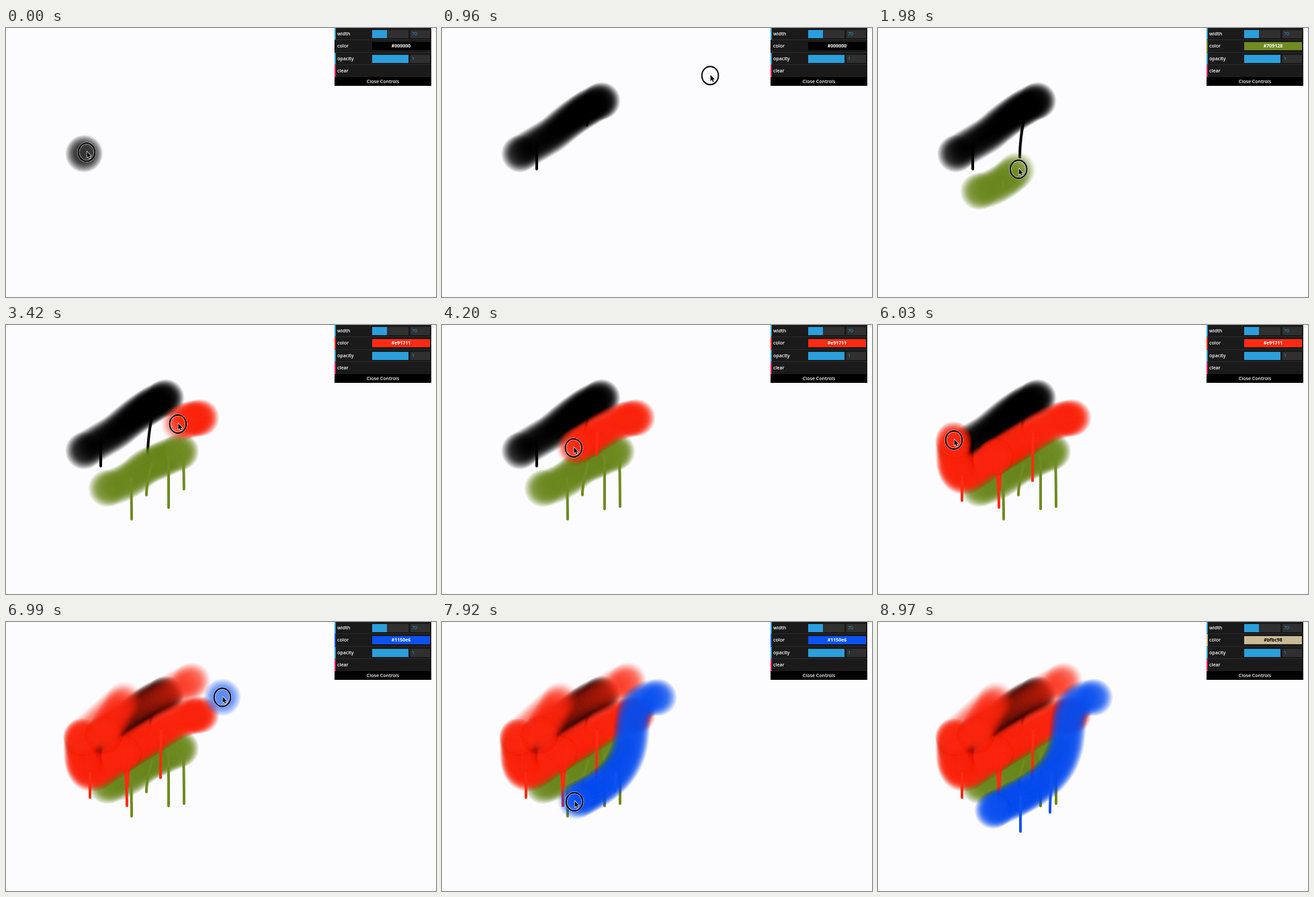
An HTML page with a canvas that plays this animation: 640x400 px, repeating every 9000 ms.

```html
<!DOCTYPE html>
<html lang="en">
<head>
<meta charset="utf-8">
<title>Spray paint</title>
<style>
  html, body { margin: 0; width: 100%; height: 100%; overflow: hidden; background: #fcfcfe; }
  canvas { position: absolute; left: 0; top: 0; }
  #panel {
    position: absolute; left: 489px; top: 0; width: 144px; height: 86px; overflow: hidden;
    background: #1a1a1a; color: #fff;
    font: 600 7px/18px "Open Sans", "Noto Sans", sans-serif;
  }
  .row {
    position: absolute; left: 0; width: 144px; height: 18.5px; box-sizing: border-box;
    padding-left: 2px; border-left: 2px solid #2fa1d6; border-bottom: 1px solid #2c2c2c;
  }
  .track, .num, #swatch { position: absolute; top: 3px; height: 12px; line-height: 12px; }
  .track { left: 54px; width: 54px; background: #303030; }
  .fill { height: 100%; background: #2a9fdc; }
  .num { left: 111px; width: 27px; padding-left: 2px; background: #303030; color: #2fa1d6; font-weight: 400; }
  #swatch { left: 54px; width: 86px; text-align: center; font-weight: 700; }
  #close {
    position: absolute; top: 73px; width: 144px; height: 13px;
    background: #000; line-height: 13px; text-align: center;
  }
</style>
</head>
<body>
<canvas id="stage" width="640" height="400"></canvas>
<div id="panel">
  <div class="row" style="top:-.5px">width
    <div class="track"><div class="fill" style="width:22px"></div></div><div class="num">70</div>
  </div>
  <div class="row" id="color" style="top:18px">color<div id="swatch"></div></div>
  <div class="row" style="top:36.5px">opacity
    <div class="track"><div class="fill"></div></div><div class="num">1</div>
  </div>
  <div class="row" style="top:55px;border-left-color:#e61d5f">clear</div>
  <div id="close">Close Controls</div>
</div>
<script>
const LOOP = 9000, STEP = 8, GAP = 1, REST = 48;
const RADIUS = 28, FLOW = 0.2, DRIP_SPEED = 0.064;
const SWATCH = { x: 588, y: 27 };

const ctx = document.getElementById('stage').getContext('2d');
const swatch = document.getElementById('swatch');
const colorRow = document.getElementById('color');

const black = { label: '#000000', fill: '#000000', ink: '#fff' };
const green = { label: '#709128', fill: '#6f8b22', ink: '#fff' };
const red = { label: '#e91711', fill: '#ff2a12', ink: '#fff' };
const blue = { label: '#1150e6', fill: '#0c52f2', ink: '#fff' };
const tan = { label: '#bfbc98', fill: '#c9bb96', ink: '#000' };

// Drips: x at the stroke, y of the final tip, sideways lean.
const legs = [
  leg(black, -60, 800, 'M116 187 L165 158 Q205 122 238 108', [[141, 210, 0], [221, 194, -10]]),
  leg(green, 1650, 2550, 'M150 243 Q180 238 207 211 L260 188',
    [[186, 290, 1], [217, 254, -8], [242, 274, 0], [264, 272, 1]]),
  leg(red, 3095, 5040, 'M290 138 Q262 140 230 162 L174 196', [[231, 233, -1], [175, 274, 5], [187, 246, -6]]),
  leg(red, 5040, 6030, 'M174 196 L136 222 Q110 238 113 171', [[125, 261, 0]]),
  leg(red, 6030, 6370, 'M113 171 L178 114 L145 168', []),
  leg(red, 6370, 6590, 'M145 168 L195 128 L278 87', []),
  leg(blue, 6955, 8400, 'M322 112 C270 112 290 160 276 195 C262 240 215 258 171 280',
    [[259, 284, -3], [212, 312, 0]])
];

function leg(paint, start, end, d, drips) {
  const path = document.createElementNS('http://www.w3.org/2000/svg', 'path');
  path.setAttribute('d', d);
  const self = { paint, start, end, path, length: path.getTotalLength() };
  self.stamps = makeStamps(self);
  self.drips = drips.map(([x, tip, lean]) => {
    const off = s => Math.abs(s.x - x);
    const source = self.stamps.reduce((a, b) => off(b) < off(a) ? b : a);
    return { x, lean, top: source.y, tip, start: source.t };
  });
  return self;
}

// The hand rests briefly, then slows down towards the end of the stroke.
function hand({ path, length, start, end }, t) {
  const u = Math.min(1, Math.max(0, (t - start - REST) / (end - start - REST)));
  return path.getPointAtLength(length * (1 - (1 - u) ** 2));
}

function makeStamps(leg) {
  const stamps = [];
  for (let t = leg.start; t <= leg.end; t += STEP) {
    const { x, y } = hand(leg, t), last = stamps[stamps.length - 1];
    const resting = t < leg.start + REST || t > leg.end - REST;
    if (resting || Math.hypot(x - last.x, y - last.y) >= GAP) stamps.push({ t, x, y });
  }
  return stamps;
}

function makeBrush(fill) {
  const brush = document.createElement('canvas');
  brush.width = brush.height = RADIUS * 2;
  const b = brush.getContext('2d');
  const g = b.createRadialGradient(RADIUS, RADIUS, 0, RADIUS, RADIUS, RADIUS);
  for (const [stop, k] of [[0, 1], [0.5, 0.9], [0.8, 0.35], [1, 0]])
    g.addColorStop(stop, fill + Math.round(FLOW * k * 255).toString(16).padStart(2, '0'));
  b.fillStyle = g;
  b.fillRect(0, 0, RADIUS * 2, RADIUS * 2);
  return brush;
}

for (const paint of [black, green, red, blue]) paint.brush = makeBrush(paint.fill);

function drawDrip({ x, lean, top, tip, start }, t) {
  const length = tip - top;
  const run = Math.min(length, (t - start) * DRIP_SPEED);
  if (run <= 0) return;
  ctx.beginPath();
  ctx.moveTo(x, top);
  for (let d = 0; d <= run; d += 2)
    ctx.lineTo(x + lean * Math.sin(d / length * Math.PI / 2), top + d);
  ctx.stroke();
}

function drawCursor({ x, y }) {
  const ring = (r, width, style) => {
    ctx.lineWidth = width;
    ctx.strokeStyle = style;
    ctx.beginPath();
    ctx.ellipse(x, y, r, r + 1.2, 0, 0, Math.PI * 2);
    ctx.stroke();
  };
  ring(13.8, 1, '#ffffff80');
  ring(10.8, 1, '#ffffff80');
  ring(12.3, 1.9, '#000');

  ctx.save();
  ctx.translate(x + 0.5, y - 1);
  const arrow = new Path2D('M0 0V9.2L2.1 7.3L3.5 10.5L5 9.8L3.6 6.8H6.4Z');
  ctx.lineWidth = 1.4;
  ctx.strokeStyle = '#fff';
  ctx.stroke(arrow);
  ctx.fillStyle = '#000';
  ctx.fill(arrow);
  ctx.restore();
}

function glide(a, b, k) {
  const u = Math.min(1, Math.max(0, k)), e = u * u * (3 - 2 * u);
  return { x: a.x + (b.x - a.x) * e, y: a.y + (b.y - a.y) * e };
}

// Between strokes the cursor visits the swatch, where the colour changes halfway.
function pose(t) {
  const i = legs.filter(l => l.start <= t).length - 1;
  const now = legs[i], next = legs[i + 1];
  if (t <= now.end) return { at: hand(now, t), paint: now.paint };
  const k = (t - now.end) / ((next ? next.start : LOOP) - now.end);
  if (k < 0.5) return { at: glide(hand(now, now.end), SWATCH, k / 0.4), paint: now.paint };
  const goal = next ? hand(next, next.start) : SWATCH;
  return { at: glide(SWATCH, goal, (k - 0.6) / 0.4), paint: next ? next.paint : tan };
}

let shown;
function showPaint(paint) {
  if (paint === shown) return;
  shown = paint;
  swatch.textContent = paint.label;
  swatch.style.background = colorRow.style.borderLeftColor = paint.fill;
  swatch.style.color = paint.ink;
}

function draw(t) {
  ctx.fillStyle = '#fcfcfe';
  ctx.fillRect(0, 0, 640, 400);
  ctx.lineCap = ctx.lineJoin = 'round';
  for (const { paint, stamps, drips } of legs) {
    for (const s of stamps) {
      if (s.t > t) break;
      ctx.drawImage(paint.brush, s.x - RADIUS, s.y - RADIUS);
    }
    ctx.strokeStyle = paint.fill;
    ctx.lineWidth = 4;
    for (const drip of drips) drawDrip(drip, t);
  }
  const { at, paint } = pose(t);
  drawCursor(at);
  showPaint(paint);
}

const begin = performance.now();
function tick() {
  draw((performance.now() - begin) % LOOP);
  requestAnimationFrame(tick);
}
tick();
</script>
</body>
</html>
```
